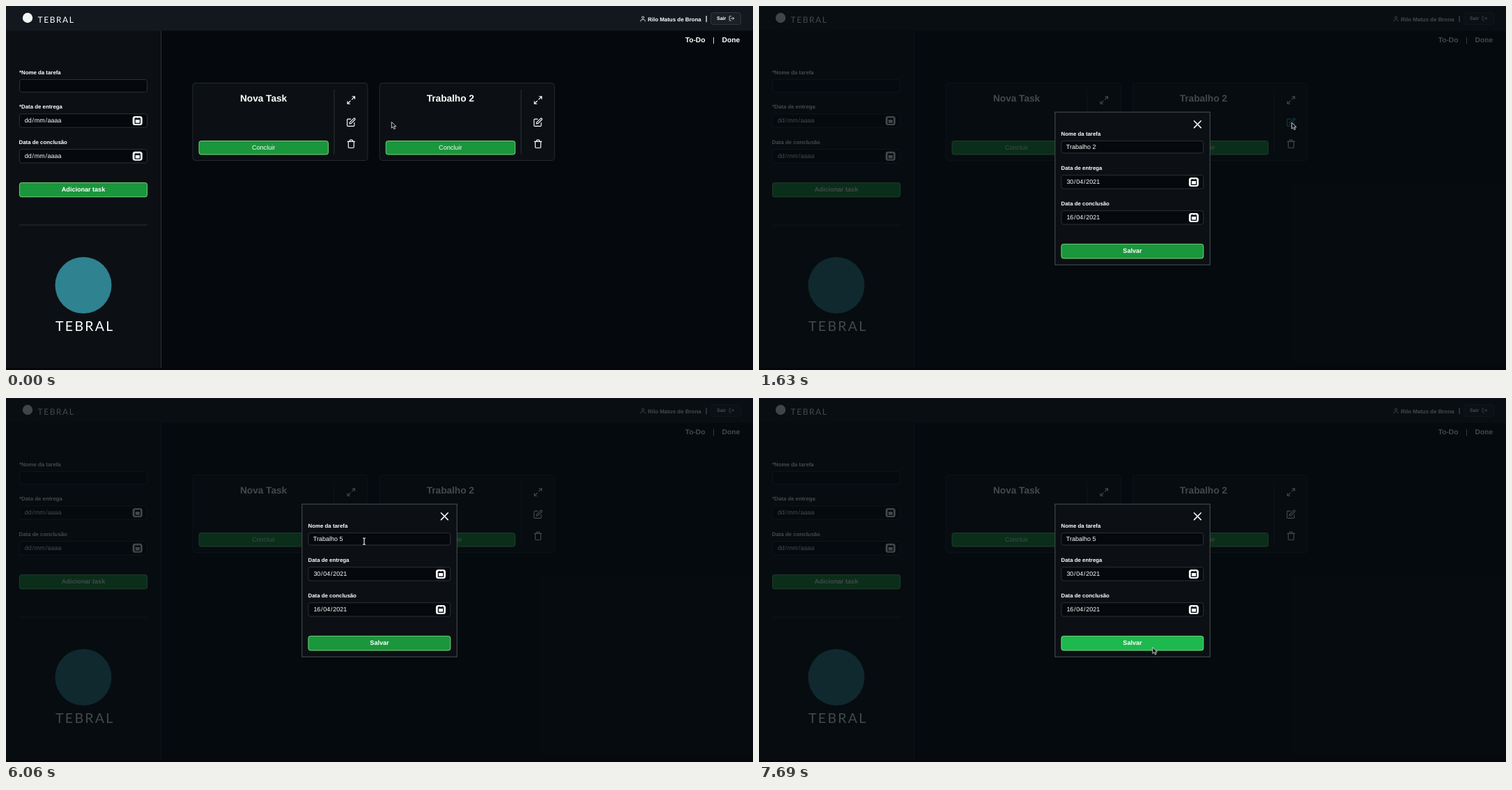
Recreate the animation shown at these times as an HTML page. Size 1072 by 522 pixels, loop 8000 ms.

```html
<!DOCTYPE html>
<html lang="pt-BR">
<head>
<meta charset="utf-8">
<title>Tarefas</title>
<style>
  html, body { margin: 0; width: 100%; height: 100%; overflow: hidden; background: #05090d; }
  svg { display: block; width: 100%; height: 100%; }
  text { font-family: "Liberation Sans", Arial, sans-serif; fill: #fff; white-space: pre; text-rendering: geometricPrecision; }
  .b { font-weight: 700; }
  .mid { text-anchor: middle; }
  .brand { font-family: Lato, sans-serif; }
  .icon { fill: none; stroke: #fff; stroke-width: 2; stroke-linecap: round; stroke-linejoin: round; }
  .field { fill: #05090d; stroke: #2b3036; }
  .rule { stroke: #2b3036; }
  .btn { fill: #1a963c; stroke: #90ee90; stroke-width: .8; }
</style>
</head>
<body>
<svg id="stage" viewBox="0 0 1072 522" preserveAspectRatio="none"></svg>
<script>
const LOOP = 8000;

const ICONS = {
  expand: 'M15 3h6v6M9 21H3v-6M21 3l-7 7M3 21l7-7',
  edit: 'M11 4H4a2 2 0 0 0-2 2v14a2 2 0 0 0 2 2h14a2 2 0 0 0 2-2v-7M18.5 2.5a2.12 2.12 0 0 1 3 3L12 15l-4 1 1-4z',
  trash: 'M3 6h18M19 6v14a2 2 0 0 1-2 2H7a2 2 0 0 1-2-2V6M8 6V4a2 2 0 0 1 2-2h4a2 2 0 0 1 2 2v2',
  user: 'M20 21v-2a4 4 0 0 0-4-4H8a4 4 0 0 0-4 4v2M16 7a4 4 0 1 1-8 0a4 4 0 0 1 8 0',
  exit: 'M9 21H5a2 2 0 0 1-2-2V5a2 2 0 0 1 2-2h4M16 17l5-5-5-5M21 12H9'
};

// Markup helpers; text is placed by the middle of its capitals.
const text = (x, y, size, str, cls = '', extra = '') =>
  `<text x="${x}" y="${y + size * 0.35}" font-size="${size}" class="${cls}" ${extra}>${str}</text>`;
const label = (x, y, str) => text(x, y, 7.85, str, 'b');
const box = (x, y, w, h, r, attrs) =>
  `<rect x="${x}" y="${y}" width="${w}" height="${h}" rx="${r}" ${attrs}/>`;
const line = (x1, y1, x2, y2) =>
  `<line class="rule" x1="${x1}" y1="${y1}" x2="${x2}" y2="${y2}"/>`;
const icon = (name, cx, cy, scale, id = '') =>
  `<path class="icon" ${id && `id="${id}"`} d="${ICONS[name]}" transform="translate(${cx} ${cy}) scale(${scale}) translate(-12 -12)"/>`;

const calendar = (x, y) =>
  box(x, y, 14, 13, 3.5, 'fill="#fff"') +
  box(x + 2.8, y + 2.6, 8.6, 8.4, 1, 'fill="#080b10"') +
  box(x + 4.1, y + 5.1, 6, 4.6, 0, 'fill="#fff"') +
  box(x + 4.3, y + 1.8, 1, 1.4, 0, 'fill="#080b10"') +
  box(x + 8.9, y + 1.8, 1, 1.4, 0, 'fill="#080b10"');

const dateText = (x, y, value) => {
  const [d, m, a] = value.split('/');
  const gap = s => `<tspan dx=".75">${s}</tspan>`;
  return text(x, y, 8.95, d + gap('/') + gap(m) + gap('/') + gap(a));
};
const dateField = (x, y, w, value) =>
  box(x, y, w, 19.5, 3, 'class="field"') +
  dateText(x + 7.5, y + 9.4, value) + calendar(x + w - 20.8, y + 3.3);

const card = (x, title, editId) =>
  box(x, 110.5, 251, 111, 4, 'fill="#0c1014" stroke="#252a30"') +
  text(x + 101.6, 132.4, 13.65, title, 'b mid') +
  box(x + 9, 193.5, 185.5, 19.5, 3, 'class="btn"') +
  text(x + 101.6, 203, 9.1, 'Concluir', 'mid') +
  line(x + 203, 120, x + 203, 213) +
  icon('expand', x + 227.3, 135, 0.58) +
  icon('edit', x + 227.3, 166.7, 0.57, editId) +
  icon('trash', x + 227.3, 197.8, 0.57);

const page =
  box(0, 0, 1072, 522, 0, 'fill="#05090d"') +
  box(0, 35, 222, 484, 0, 'fill="#0c1014"') +
  line(222.5, 35, 222.5, 519) +
  box(0, 0, 1072, 35.5, 0, 'fill="#12181d"') +
  '<circle cx="31" cy="17" r="7.2" fill="#f2f4f5"/>' +
  text(45.6, 19.5, 12, 'TEBRAL', 'brand', 'letter-spacing="1.55"') +
  icon('user', 914, 18.4, 0.39) +
  text(921, 18.8, 7.95, 'Rilo Matus de Brona', 'b') +
  text(1005, 18, 9.5, '|', 'b mid') +
  box(1011.5, 9.5, 43, 17, 3, 'fill="#1b2026" stroke="#30363d"') +
  text(1020, 17.8, 7, 'Sair', 'b') +
  icon('exit', 1041.4, 17.8, 0.36) +
  text(974.7, 48.7, 10.25, 'To-Do', 'b') +
  text(1015.5, 48.3, 10, '|', 'mid') +
  text(1027.5, 48.7, 10.25, 'Done', 'b') +
  label(19, 95.4, '*Nome da tarefa') +
  box(19.5, 105.5, 183, 18, 3, 'class="field"') +
  label(19, 144.6, '*Data de entrega') +
  dateField(19.3, 154.7, 183.2, 'dd/mm/aaaa') +
  label(18.6, 195.3, 'Data de conclusão') +
  dateField(19.3, 205.5, 183.2, 'dd/mm/aaaa') +
  box(19.4, 253.4, 183.2, 20.4, 3, 'class="btn"') +
  text(111, 263.3, 9.05, 'Adicionar task', 'b mid') +
  line(19, 314, 203, 314) +
  '<circle cx="111" cy="400.5" r="40.5" fill="#2f8290"/>' +
  text(71, 459.2, 19.5, 'TEBRAL', 'brand', 'letter-spacing="2.3"') +
  card(268, 'Nova Task', '') + card(536.2, 'Trabalho 2', 'edit') +
  box(0, 519, 1072, 3, 0, 'fill="#0a050b"');

const modal =
  box(0, 1, 1072, 518, 0, 'fill="#050b0f" fill-opacity=".75"') +
  box(424.8, 152.2, 222.4, 219, 0, 'fill="#0c1014" stroke="#4c5054"') +
  '<path class="icon" style="stroke-width:1.5" d="M624.4 164.8l9.8 9.8M634.2 164.8l-9.8 9.8"/>' +
  label(433.6, 183, 'Nome da tarefa') +
  box(433.9, 193.5, 203.8, 17.5, 3, 'class="field"') +
  text(440.8, 201.8, 9, '', '', 'id="name"') +
  box(483, 197, 1, 10, 0, 'id="caret" fill="#fff"') +
  label(433.6, 232, 'Data de entrega') +
  dateField(433.9, 242.6, 203.8, '30/04/2021') +
  label(433.6, 283.1, 'Data de conclusão') +
  dateField(433.9, 293.6, 203.8, '16/04/2021') +
  box(433.9, 341.4, 203.9, 20.6, 3, 'class="btn" id="save"') +
  text(536, 351.3, 9.1, 'Salvar', 'b mid');

const BEAM = 'M-2-4.8Q0-4.8 0-3.8Q0-4.8 2-4.8M0-3.8V3.8M-2 4.8Q0 4.8 0 3.8Q0 4.8 2 4.8';
const cursors =
  '<g id="cursor">' +
  '<path id="arrow" d="M.3 .3V9.1L2.4 7.2 3.9 10.5 5.5 9.8 4 6.6H6.9Z" fill="#0b0d10" stroke="#f4f4f4" stroke-width=".8" stroke-linejoin="round"/>' +
  '<path id="hand" d="M-.9 .2Q0-.6.8.2V3.2L4 4Q4.9 4.4 4.6 5.6L3.7 9.6H-1.1L-3.5 6Q-3.4 4.8-2.3 5.2L-.9 6.2Z" fill="#fff" stroke="#15181b" stroke-width=".6" stroke-linejoin="round"/>' +
  `<g id="beam" fill="none"><path d="${BEAM}" stroke="#000" stroke-width="2.2"/>` +
  `<path d="${BEAM}" stroke="#fff" stroke-width="1.1"/></g>` +
  '</g>';

document.getElementById('stage').innerHTML = page + `<g id="modal">${modal}</g>` + cursors;
const $ = id => document.getElementById(id);

// Pointer path: time, x, y
const PATH = [
  [70, 553, 166], [300, 712, 182], [380, 747, 180],
  [570, 747, 180], [810, 763, 162], [1000, 764.7, 167],
  [2070, 764, 167], [2560, 527.5, 200.5], [2810, 523, 201.5],
  [6000, 523, 201.5], [6060, 514, 205.5],
  [6320, 514, 205.5], [7080, 567, 361.5], [7190, 565.6, 357.8],
  [7640, 565.6, 357.8], [7690, 564.6, 357.4]
];
const SHAPE = [
  [0, 'arrow'], [790, 'hand'], [1560, 'arrow'], [2440, 'beam'],
  [6380, 'arrow'], [7000, 'hand'], [7690, 'arrow']
];
const NAME = [[0, 'Trabalho 2'], [4000, 'Trabalho '], [5440, 'Trabalho 5']];
// Caret left edge; 0 hides it
const CARET = [
  [0, 0], [2810, 483], [3440, 0], [3940, 483], [4000, 478], [4630, 0],
  [5190, 478], [5440, 483], [6060, 0], [6640, 483], [7310, 0]
];

const stepAt = (table, t) => table.filter(row => row[0] <= t).pop()[1];

function pointAt(t) {
  const i = PATH.findIndex(p => p[0] > t);
  if (i === 0) return PATH[0].slice(1);
  if (i < 0) return PATH[PATH.length - 1].slice(1);
  const [a, b] = [PATH[i - 1], PATH[i]];
  const k = (t - a[0]) / (b[0] - a[0]);
  return [a[1] + (b[1] - a[1]) * k, a[2] + (b[2] - a[2]) * k];
}

const show = (el, on) => { el.style.display = on ? '' : 'none'; };

function draw(t) {
  const [x, y] = pointAt(t);
  $('cursor').setAttribute('transform', `translate(${x} ${y})`);
  const shape = stepAt(SHAPE, t);
  for (const id of ['arrow', 'hand', 'beam']) show($(id), id === shape);

  $('edit').style.stroke = t >= 790 && t < 1880 ? '#4db4e6' : '';
  show($('modal'), t >= 1630);
  $('name').textContent = stepAt(NAME, t);

  const caret = stepAt(CARET, t);
  show($('caret'), caret > 0);
  $('caret').setAttribute('x', caret);

  const glow = Math.min(1, Math.max(0, (t - 7040) / 500));
  const mix = (a, b) => Math.round(a + (b - a) * glow);
  $('save').style.fill = `rgb(${mix(26, 29)},${mix(150, 184)},${mix(60, 78)})`;
}

const start = performance.now();
function tick() {
  draw((performance.now() - start) % LOOP);
  requestAnimationFrame(tick);
}
tick();
</script>
</body>
</html>
```
